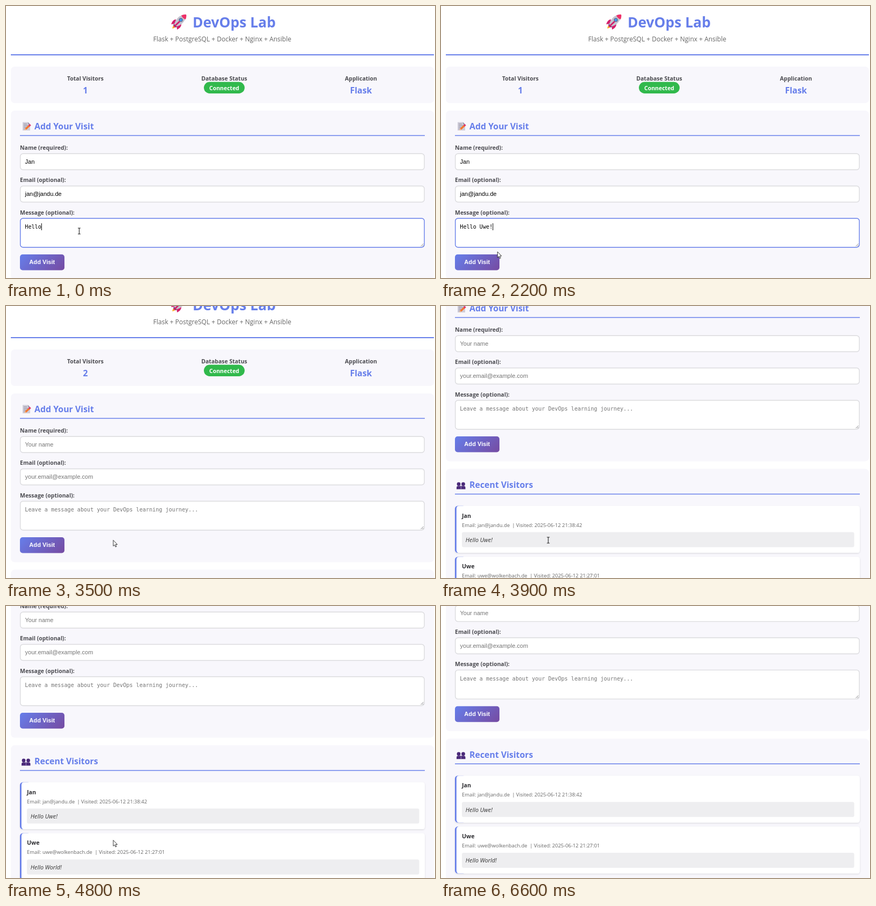
These frames come from a looping animation (800x507 px, 6700 ms). An HTML page:

```html
<!DOCTYPE html>
<html lang="en">
<head>
<meta charset="utf-8">
<title>DevOps Lab</title>
<style>
  html, body { margin: 0; width: 100%; height: 100%; overflow: hidden; background: #fff; }
  svg { display: block; width: 800px; height: 507px; }
  text { font-family: "Open Sans", "Noto Sans", sans-serif; white-space: pre; }
  .brand { fill: #667eea; font-weight: 700; }
  .title { font-size: 26.4px; }
  .h2 { font-size: 15.9px; }
  .label { font-size: 10.5px; font-weight: 700; fill: #4b4b50; }
  .sub { font-size: 12px; fill: #666; }
  .name { font-size: 10.7px; font-weight: 700; fill: #2c2c30; }
  .meta { font-size: 9.42px; fill: #666; }
  .quote { font-size: 10.8px; font-style: italic; fill: #333; }
  .field { font-family: "Liberation Sans", Arial, sans-serif; font-size: 11.02px; }
  .mono { font-family: "DejaVu Sans Mono", monospace; font-size: 10.13px; }
  .button { font-family: "Liberation Sans", Arial, sans-serif; font-size: 11.1px; font-weight: 700; fill: #fff; }
  .mid { text-anchor: middle; }
  .panel { fill: #f8f7fc; }
  .box { fill: #fff; stroke: #dbdbde; stroke-width: 1.4; }
</style>
</head>
<body>
<svg viewBox="0 0 800 507">
  <defs>
    <linearGradient id="grad" gradientUnits="userSpaceOnUse" x1="39.5" y1="449.5" x2="95.5" y2="505.5">
      <stop offset="0" stop-color="#667eea"/><stop offset="1" stop-color="#764ba2"/>
    </linearGradient>
    <filter id="glow" x="-20%" y="-40%" width="140%" height="200%">
      <feDropShadow dx="0" dy="2.8" stdDeviation="3.4" flood-color="#667eea" flood-opacity=".4"/>
    </filter>
    <filter id="soft" x="-2%" y="-10%" width="104%" height="125%">
      <feDropShadow dx="0" dy="1.2" stdDeviation="1.5" flood-color="#000" flood-opacity=".12"/>
    </filter>
  </defs>

  <g id="page">
    <g id="rocket">
      <path d="M310 42 Q311 35 316 34 L318 37 Q316 41 310 42Z" fill="#ffb02e"/>
      <path d="M317 25 Q311 25 308 34 L316 33Z M327 34 Q327 40 319 44 L318 36Z" fill="#d3206c"/>
      <path d="M314 33 Q318 21 328 17 Q333 15 336 16 Q337 20 334 25 Q329 35 319 38Z" fill="#c4c3cf"/>
      <path d="M327 17.5 Q333 15 336 16 Q337 19 335 25 Q329 23 327 17.5Z" fill="#ef2f68"/>
      <path d="M313 33 L319 39 L316 40 L312 36Z" fill="#6b438c"/>
      <circle cx="326" cy="26" r="3.6" fill="#5b5879"/>
      <circle cx="326" cy="26" r="2.5" fill="#3f9df0"/>
      <path d="M314 38 L323 29.5" stroke="#d3206c" stroke-width="2.8" stroke-linecap="round"/>
    </g>
    <text class="brand title" x="348" y="39.5">DevOps Lab</text>
    <text class="sub mid" x="403.3" y="66.3">Flask + PostgreSQL + Docker + Nginx + Ansible</text>
    <rect x="9" y="90" width="789" height="2" fill="#667eea"/>

    <rect class="panel" x="9" y="113" width="789" height="68" rx="7"/>
    <text class="label mid" x="148" y="138.5">Total Visitors</text>
    <text class="brand h2 mid" x="148" y="162.6" id="count"></text>
    <text class="label mid" x="407" y="138.5">Database Status</text>
    <rect x="369" y="141.5" width="76" height="21.5" rx="10.7" fill="#31b94c"/>
    <text class="label mid" x="407" y="156.6" style="fill:#fff">Connected</text>
    <text class="label mid" x="662" y="138.5">Application</text>
    <text class="brand h2 mid" x="662" y="162.6">Flask</text>

    <rect class="panel" x="9" y="195" width="789" height="314.6" rx="7"/>
    <g id="memo">
      <path d="M31 216.5 H41 L45 220.5 V232 H31Z" fill="#cfcdd9"/>
      <path d="M41 216.5 V220.5 H45Z" fill="#9c99ad"/>
      <path d="M33 220 H39 M33 223 H42 M33 226 H38 M33 229 H37" stroke="#8e8b9f" stroke-width="1"/>
      <path d="M36.5 229.5 L43.5 223" stroke="#f4772f" stroke-width="3.6"/>
      <path d="M43 223.4 L45.5 221.2" stroke="#e0346c" stroke-width="3.6"/>
      <path d="M34 232 L35.3 228.2 L37.8 230.9Z" fill="#f3c19a"/>
    </g>
    <text class="brand h2" x="53" y="230">Add Your Visit</text>
    <rect x="26" y="240.7" width="755" height="1.5" fill="#667eea"/>

    <text class="label" x="26" y="268.2">Name (required):</text>
    <rect class="box" x="26.7" y="275.2" width="753.4" height="30" rx="5"/>
    <text class="field" x="35.5" y="293.8" id="nameField"></text>
    <text class="label" x="26" y="328.4">Email (optional):</text>
    <rect class="box" x="26.7" y="335.5" width="753.4" height="30" rx="5"/>
    <text class="field" x="35.5" y="354" id="mailField"></text>
    <text class="label" x="26" y="388.6">Message (optional):</text>
    <rect class="box" x="26.7" y="395.7" width="753.4" height="54" rx="5" id="area"/>
    <text class="mono" x="35.3" y="415" id="message"></text>
    <rect y="405" width="1" height="13" id="caret"/>
    <path d="M773.5 448 L778.5 443 M776.5 448 L778.5 446" stroke="#77777c" stroke-width=".9"/>

    <rect x="26" y="463" width="83" height="29.5" rx="5" fill="url(#grad)" id="button"/>
    <text class="button mid" x="67.3" y="481.4">Add Visit</text>

    <rect class="panel" x="9" y="523.6" width="789" height="330" rx="7"/>
    <g fill="#4b2a7a">
      <circle cx="33" cy="552" r="3.4"/><circle cx="41.5" cy="552" r="3.4"/>
      <path d="M29 561.5 V558.5 Q29 555.5 32 555.5 H42.5 Q45.5 555.5 45.5 558.5 V561.5Z"/>
      <path d="M37.3 556 V561.5" stroke="#b9a5d6" stroke-width=".8"/>
    </g>
    <text class="brand h2" x="53" y="559">Recent Visitors</text>
    <rect x="26" y="569.8" width="755" height="1.5" fill="#667eea"/>
    <g id="cards"></g>
  </g>

  <g id="cursor" stroke-linejoin="round">
    <path id="beam" d="M-2.5 -5.5 H-.7 L0 -5 L.7 -5.5 H2.5 M0 -5 V5 M-2.5 5.5 H-.7 L0 5 L.7 5.5 H2.5" fill="none" stroke="#222" stroke-width="1.1"/>
    <path id="arrow" d="M0 0 V11 L2.5 8.7 L4.2 12.6 L6 11.8 L4.3 8 H7.6Z" fill="#fff" stroke="#222" stroke-width=".9"/>
    <path id="hand" d="M-1.3 -6 Q0 -7.3 1 -6 V-1.6 Q2.2 -2.4 3 -1.2 Q4.2 -1.8 4.8 -.5 Q6 -.8 6.2 .7 V4 L5 8 H-1 L-4.3 2.7 Q-4.3 1 -2.8 1.5 L-1.3 2.8Z" fill="#fff" stroke="#222" stroke-width=".9"/>
  </g>
</svg>
<script>
const LOOP = 6700, STEP = 100;
const SUBMIT = 2900, BLUR = 2700;
const MONO_ADVANCE = 6.1;
const $ = id => document.getElementById(id);

const keyTimes = [200, 400, 500, 600, 800];
const typed = "Hello Uwe!";

// Rows of [time, value...], interpolated linearly.
const scrollTrack = [[3300, 0], [3500, 32], [3700, 140], [3900, 220], [4100, 237], [4400, 250.2],
  [4800, 264], [5200, 272.5], [5600, 276.3]];
const cursorTrack = [[1800, 136.5, 419.5], [2100, 118, 446], [2400, 80, 482], [2500, 75, 490],
  [3000, 75, 490], [3200, 135, 458], [3400, 200, 436.5], [5000, 200, 436.5], [5500, 214, 520]];

function sample(track, t) {
  const next = track.findIndex(row => row[0] > t);
  if (next === 0) return track[0].slice(1);
  if (next < 0) return track[track.length - 1].slice(1);
  const a = track[next - 1], b = track[next];
  const k = (t - a[0]) / (b[0] - a[0]);
  return a.slice(1).map((v, i) => v + (b[i + 1] - v) * k);
}

function card(y, name, mail, visitedX, visited, quote) {
  return `<g transform="translate(0 ${y})">
    <g filter="url(#soft)">
      <rect x="26" width="20" height="87.5" rx="5.5" fill="#667eea"/>
      <rect x="28.8" width="752.2" height="87.5" rx="4" ry="5.5" fill="#fff"/>
    </g>
    <text class="name" x="39" y="22">${name}</text>
    <text class="meta" x="39" y="39">Email: ${mail}</text>
    <text class="meta" x="${visitedX}" y="39">| Visited: ${visited}</text>
    <rect x="39" y="49" width="731.5" height="28" rx="3" fill="#eeeef0"/>
    <text class="quote" x="45.8" y="67.4">${quote}</text></g>`;
}
$("cards").innerHTML =
  card(592.5, "Jan", "jan@jandu.de", 132.5, "2025-06-12 21:38:42", typed) +
  card(687.4, "Uwe", "uwe@wolkenbach.de", 165.6, "2025-06-12 21:27:01", "Hello World!");

const show = (id, on) => $(id).setAttribute("visibility", on ? "visible" : "hidden");

function fill(id, value, placeholder, empty) {
  $(id).textContent = empty ? placeholder : value;
  $(id).setAttribute("fill", empty ? "#757575" : "#000");
}

function drawForm(t) {
  const sent = t >= SUBMIT, focused = t < BLUR;
  const keys = keyTimes.filter(k => k <= t);
  const text = typed.slice(0, 5 + keys.length);
  $("count").textContent = sent ? 2 : 1;
  fill("nameField", "Jan", "Your name", sent);
  fill("mailField", "jan@jandu.de", "your.email@example.com", sent);
  fill("message", text, "Leave a message about your DevOps learning journey...", sent);
  $("area").style.stroke = focused ? "#667eea" : "";
  const lastKey = keys.length ? keys[keys.length - 1] : 0;
  show("caret", focused && (t - lastKey) % 1000 < 500);
  $("caret").setAttribute("x", 35.3 + text.length * MONO_ADVANCE);
}

function drawCursor(t, scroll) {
  const [x, y] = sample(cursorTrack, t);
  const pageY = y + scroll;
  const over = (top, bottom) => pageY > top && pageY < bottom;
  const onButton = x > 26 && x < 109 && over(463, 493);
  const onText = over(395, 450) || over(641, 670);
  $("cursor").setAttribute("transform", `translate(${x} ${y})`);
  show("hand", onButton);
  show("beam", onText && !onButton);
  show("arrow", !onText && !onButton);
  $("button").setAttribute("filter", onButton ? "url(#glow)" : "none");
}

function draw(now) {
  const t = Math.floor(now % LOOP / STEP) * STEP;
  const [scroll] = sample(scrollTrack, t);
  $("page").setAttribute("transform", `translate(0 ${-scroll})`);
  drawForm(t);
  drawCursor(t, scroll);
}

let start;
function tick(now) {
  start ??= now;
  draw(now - start);
  requestAnimationFrame(tick);
}
draw(0);
requestAnimationFrame(tick);
</script>
</body>
</html>
```
